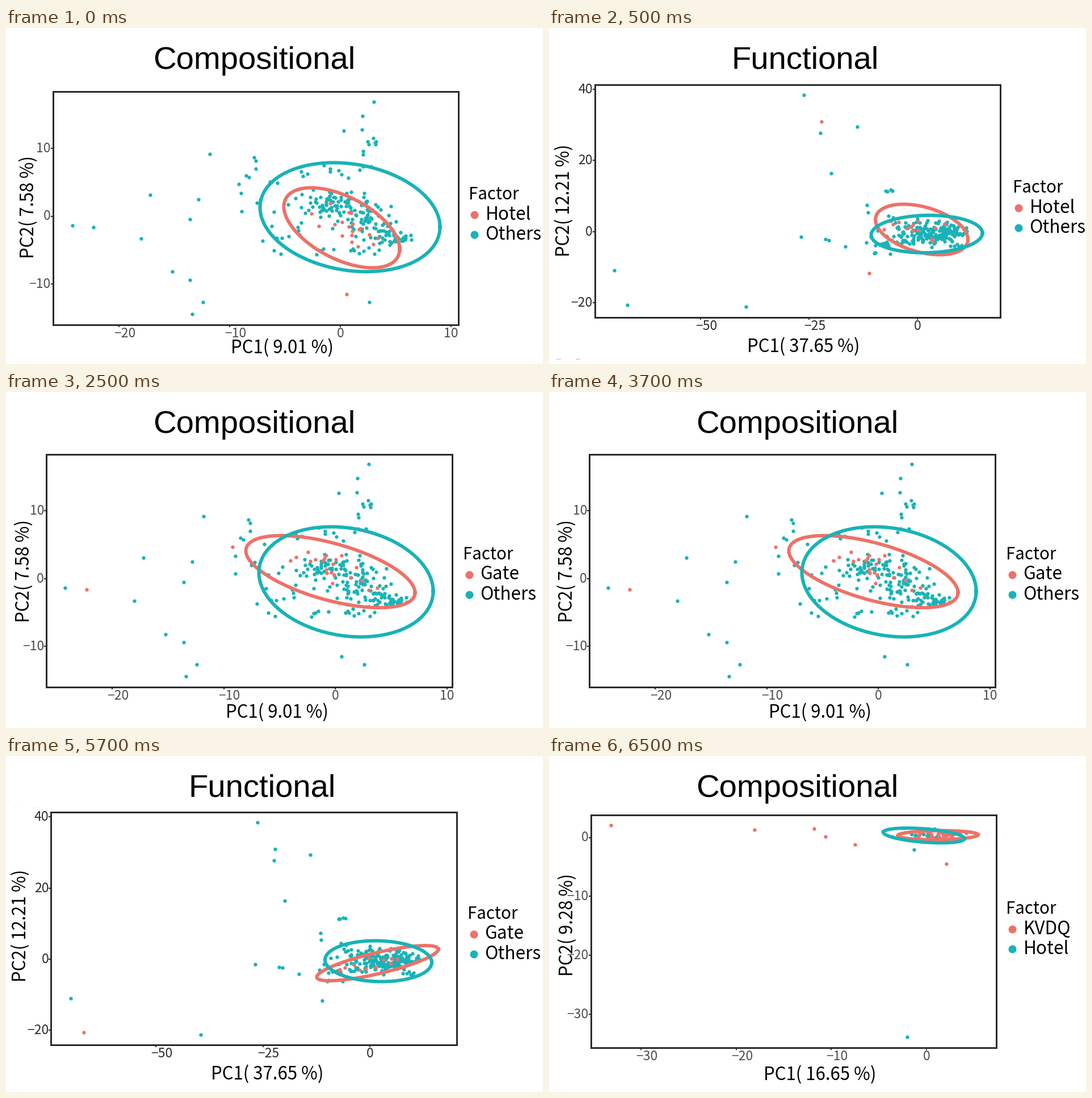
A matplotlib script that plays this animation: 946x592 px, repeating every 8 s.

```python
import numpy as np
import matplotlib.pyplot as plt
from matplotlib.animation import FuncAnimation

W, H, DPI = 946, 592, 64
PT = 72 / DPI  # points per pixel
RED, TEAL, INK, GREY = "#ed7268", "#18b3b7", "#2b2b2b", "#4d4d4d"
SANS = "Noto Sans CJK JP"
rng = np.random.default_rng(4)


def cloud(n, center, spread, xlim, ylim, slope=0):
    """Normal cloud around a sloped line, kept inside a box (PC units)."""
    x = rng.normal(center[0], spread[0], 12 * n)
    y = center[1] + slope * (x - center[0]) + rng.normal(0, spread[1], 12 * n)
    keep = (x > xlim[0]) & (x < xlim[1]) & (y > ylim[0]) & (y < ylim[1])
    return np.column_stack([x, y])[keep][:n]


def compositional_points():
    outliers = [(-24.2, -1.4), (-17.2, 3.1), (-18, -3.3), (-13.6, -.5),
                (-12.8, 2.5), (-11.8, 9.2), (-15.2, -8.2), (-13.6, -9.4),
                (-12.4, -12.7), (-13.4, -14.4), (2.6, -12.7), (3, 16.9),
                (2, 14.8), (.3, 12.6)]
    others = np.vstack([
        outliers,
        cloud(11, (-8, 2), (1.5, 5), (-10.2, -6), (-6.3, 9.2)),
        cloud(9, (2.6, 11), (.6, 2), (1.9, 3.4), (8.3, 13)),
        cloud(12, (0, 7), (3, 1), (-5, 2.8), (5.2, 8.2)),
        cloud(18, (-4.2, -1.5), (1.2, 3), (-6.2, -2.5), (-5.6, 3)),
        cloud(13, (.8, -5), (2, .7), (-2.2, 3.5), (-6.1, -4)),
        cloud(26, (-1.2, 1.9), (1, 1.1), (-2.8, .7), (-.5, 4), -.5),
        cloud(84, (1.8, 0), (1.6, 1.8), (-1.5, 5.2), (-4, 3.6), -.6),
        cloud(30, (4.9, -3.1), (.8, .6), (3.7, 7), (-4.3, -1.5), -.3),
    ])
    hotel = np.vstack([
        [(.55, -11.5)],
        cloud(19, (1, -2.2), (2.3, 1.6), (-5.3, 4.7), (-5, 2.5), -.5)])
    gate = np.vstack([
        [(-22.3, -1.6), (-9.2, 4.7)],
        cloud(22, (0, 1.4), (2.6, 1.3), (-5.8, 4.2), (-1.9, 7.4), -.5)])
    return others, hotel, gate


def functional_points():
    outliers = [(-26.2, 38.4), (-22.4, 27.7), (-13.9, 29.4), (-19.9, 16.4),
                (-69.9, -11), (-39.5, -21.2), (-26.8, -1.5), (-21.2, -2.2),
                (-20.4, -2.4), (-16.6, -4.2), (-11.6, 7.4)]
    others = np.vstack([
        outliers,
        cloud(4, (-6, 11.5), (.9, .7), (-7.3, -5), (11, 12.5)),
        cloud(22, (-9, -1.5), (4, 4), (-13.2, -4), (-6.6, 5.5)),
        cloud(85, (1.2, -.4), (4.2, 2.2), (-6.4, 11), (-5.2, 4)),
        cloud(105, (4.9, -.4), (3.2, 1.4), (-2.5, 11.4), (-4.4, 2.9)),
    ])
    hotel = np.vstack([
        [(-22.1, 30.9), (-11.1, -11.7)],
        cloud(14, (0, 1.3), (5, 1.6), (-8, 7.5), (-3.5, 3.8), -.2)])
    gate = np.vstack([
        [(-66.9, -20.6)],
        cloud(12, (2.5, -1), (5, 1), (-7.2, 10), (-3.8, 1.8), .25)])
    return others, hotel, gate


def hotel_pair_points():
    red = np.vstack([
        [(-33.2, 2.1), (-18.1, 1.3), (-11.8, 1.5), (-10.6, .1), (-7.5, -1.2),
         (2.1, -4.5)],
        cloud(65, (1.2, .4), (1.6, .45), (-4, 4.2), (-1.3, 1.8))])
    teal = np.vstack([
        [(-2, -33.9), (-4.6, 1), (-1.3, -2.1)],
        cloud(7, (0, .3), (1.5, .4), (-2.6, 2), (-.6, 1))])
    return red, teal


def text(ax, x, y, s, size, color="black", ha="center", font=SANS, rotation=0):
    ax.text(x, y, s, size=size * PT, color=color, ha=ha, va="baseline",
            family=font, rotation=rotation, rotation_mode="anchor")


def dots(ax, x, y, color, size=6.4):
    ax.plot(x, y, "o", color=color, ms=size * PT, mew=0)


def ellipse(ax, color, cx, cy, half_w, half_h, rho):
    """Confidence ellipse from its bounding box and correlation."""
    t = np.linspace(0, 2 * np.pi, 300)
    ax.plot(cx + half_w * np.cos(t), cy + half_h * np.sin(t + np.arcsin(rho)),
            color=color, lw=6 * PT)


def scene(title, shares, box, origin, unit, xticks, yticks, tick_color,
          xlabel, ylabel, legend, names, groups, ellipses):
    ax = fig.add_axes([0, 0, 1, 1])
    ax.set(xlim=(0, W), ylim=(H, 0))
    ax.axis("off")
    left, top = box
    right, bottom = left + 714.5, top + 410.5

    for (x, y), color in ((group.T, color) for group, color in groups):
        dots(ax, origin[0] + unit[0] * x, origin[1] - unit[1] * y, color)
    for color, shape in zip((RED, TEAL), ellipses):
        ellipse(ax, color, *shape)

    for v in xticks:
        x = origin[0] + unit[0] * v
        ax.plot([x, x], [bottom, bottom + 3], color=INK, lw=2 * PT)
        shift = 10 if v < 0 else 0
        text(ax, x + shift, bottom + 22, f"{v}".replace("-", "−"), 23, tick_color)
    for v in yticks:
        y = origin[1] - unit[1] * v
        ax.plot([left - 3, left], [y, y], color=INK, lw=2 * PT)
        text(ax, left - 4, y + 7, f"{v}".replace("-", "−"), 23, tick_color, "right")
    ax.add_patch(plt.Rectangle(box, right - left, bottom - top, fill=False,
                               ec=INK, lw=3 * PT, joinstyle="miter"))

    text(ax, 437 if title == "Compositional" else 451, 72, title, 56.3,
         font="Liberation Sans")
    text(ax, *xlabel, f"PC1( {shares[0]:.2f} %)", 31.2)
    text(ax, *ylabel, f"PC2( {shares[1]:.2f} %)", 31.2, rotation=90)

    lx, ly = legend
    text(ax, lx, ly, "Factor", 29.5, ha="left")
    for i, (name, color) in enumerate(zip(names, (RED, TEAL))):
        dots(ax, lx + 10, ly + 26.5 + 35.5 * i, color, 14)
        text(ax, lx + 30, ly + 35.5 * (i + 1), name, 31.5, ha="left")
    return ax


def specks(ax, y, color):
    for x in (13, 47):
        ax.plot([x, x + 7], [y, y], color=color, lw=PT)


fig = plt.figure(figsize=(W / DPI, H / DPI), dpi=DPI, facecolor="white")

c_others, c_hotel, c_gate = compositional_points()
f_others, f_hotel, f_gate = functional_points()
p_red, p_teal = hotel_pair_points()

compositional = dict(title="Compositional", shares=(9.01, 7.58), tick_color=GREY,
                     xticks=range(-20, 11, 10), yticks=range(-10, 11, 10))
functional = dict(title="Functional", shares=(37.65, 12.21), tick_color=INK,
                  xticks=range(-50, 1, 25), yticks=range(-20, 41, 20))

scenes = [
    scene(**compositional, box=(82.5, 112.3), origin=(589, 331.5),
          unit=(19.5, 11.95), xlabel=(486.5, 573), ylabel=(49, 315.5),
          legend=(814.5, 302), names=("Hotel", "Others"),
          groups=[(c_others, TEAL), (c_gate, TEAL), (c_hotel, RED)],
          ellipses=[(591.5, 352, 102, 70.5, .53), (606, 333.3, 158.5, 96, .18)]),
    scene(**functional, box=(80.7, 99.8), origin=(649, 358.5),
          unit=(7.64, 6.27), xlabel=(448, 571), ylabel=(36, 303.5),
          legend=(816.5, 290), names=("Hotel", "Others"),
          groups=[(f_others, TEAL), (f_gate, TEAL), (f_hotel, RED)],
          ellipses=[(656.5, 355, 81.5, 44.5, .39), (665.5, 363, 98, 33, -.05)]),
    scene(**compositional, box=(71, 109.5), origin=(580, 328.7),
          unit=(19.65, 11.95), xlabel=(477.5, 574), ylabel=(41, 315.5),
          legend=(805.5, 295), names=("Gate", "Others"),
          groups=[(c_others, TEAL), (c_hotel, TEAL), (c_gate, RED)],
          ellipses=[(571.5, 316.5, 149, 63.5, .58), (599, 334.5, 153.5, 97, .17)]),
    scene(**functional, box=(79.3, 98.8), origin=(641, 358),
          unit=(7.54, 6.27), xlabel=(460, 570), ylabel=(35, 298.5),
          legend=(813.5, 287), names=("Gate", "Others"),
          groups=[(f_others, TEAL), (f_hotel, TEAL), (f_gate, RED)],
          ellipses=[(654.5, 365, 107, 31, -.79), (656, 361.5, 94, 36, .06)]),
    scene("Compositional", (16.65, 9.28), box=(73.7, 103.8), origin=(665, 143.5),
          unit=(16.76, 10.37), xticks=range(-30, 1, 10),
          yticks=range(-30, 1, 10), tick_color=GREY,
          xlabel=(477.5, 571), ylabel=(42, 297),
          legend=(805.5, 278), names=("KVDQ", "Hotel"),
          groups=[(p_red, RED), (p_teal, TEAL)],
          ellipses=[(685, 139.5, 71, 8, -.1), (660.5, 140, 71.5, 13, .42)]),
]
specks(scenes[1], 583, "#b8b8b8")
specks(scenes[3], 90, "#f0f0f0")


def update(step):
    # The first scene lasts one step, the following ones four each.
    current = (step + 3) // 4
    for i, ax in enumerate(scenes):
        ax.set_visible(i == current)
    return scenes


anim = FuncAnimation(fig, update, frames=16, interval=500, repeat=True,
                     repeat_delay=0, blit=False)
plt.show()
```
